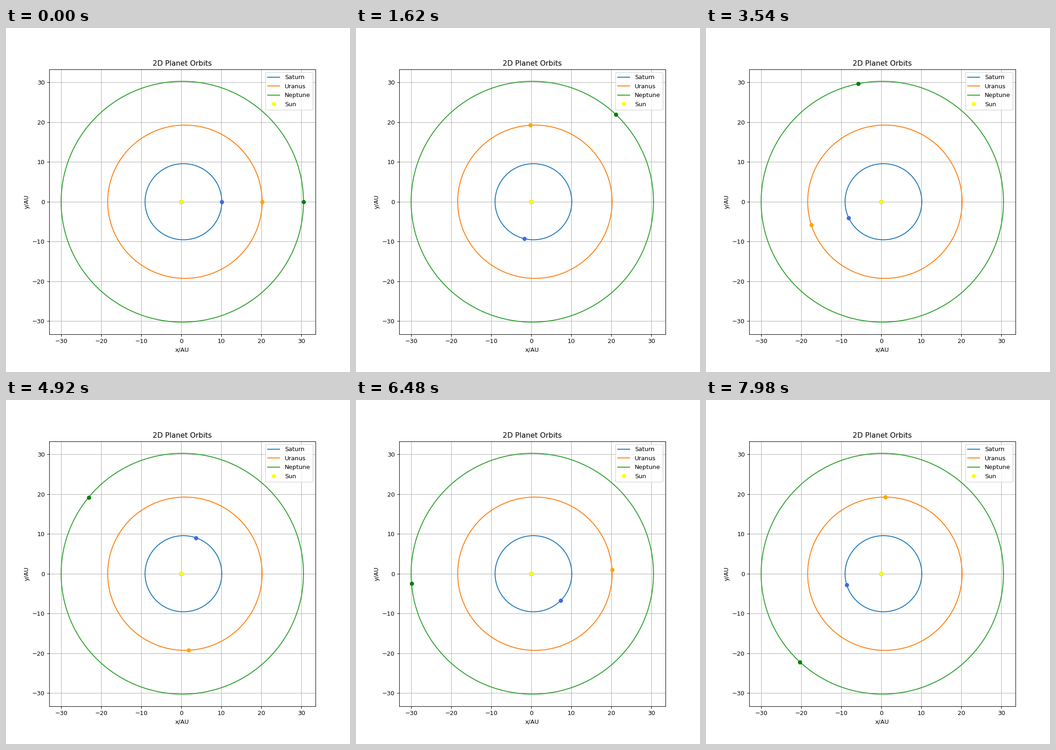
A matplotlib script that plays this animation: 748x748 px, repeating every 8000 ms.

```python
import numpy as np
import matplotlib.pyplot as plt
from matplotlib.animation import FuncAnimation

TICK_MS = 20        # timer interval
TICKS_PER_STEP = 3  # the planets move every 60 ms
LOOP_MS = 8000

# name, semi-major axis (AU), eccentricity, degrees per step, dot colour
PLANETS = [
    ("Saturn", 9.58, 0.0565, 9.608, "royalblue"),
    ("Uranus", 19.28, 0.0472, 3.3595, "orange"),
    ("Neptune", 30.26, 0.0086, 1.7108, "green"),
]


def orbit(a, e, theta):
    """Point on an ellipse with the Sun in one focus, aphelion on +x."""
    r = a * (1 - e**2) / (1 - e * np.cos(theta))
    return r * np.cos(theta), r * np.sin(theta)


fig, ax = plt.subplots(figsize=(8, 8), dpi=93.5)
turn = np.linspace(0, 2 * np.pi, 721)

for name, a, e, _, _ in PLANETS:
    ax.plot(*orbit(a, e, turn), label=name)

# Planet-coloured dots under the Sun give it a dark rim
for *_, color in PLANETS:
    ax.plot(0, 0, "o", color=color)
ax.plot(0, 0, "o", color="yellow", label="Sun")

dots = [ax.plot(*np.reshape(orbit(a, e, 0), (2, 1)), "o", color=color)[0]
        for _, a, e, _, color in PLANETS]

ax.set_title("2D Planet Orbits")
ax.set_xlabel("x/AU")
ax.set_ylabel("y/AU")
ax.grid(True)
ax.legend(loc="upper right")


def update(tick):
    step = tick // TICKS_PER_STEP
    for dot, (_, a, e, rate, _) in zip(dots, PLANETS):
        x, y = orbit(a, e, np.radians(rate * step))
        dot.set_data([x], [y])
    return dots


anim = FuncAnimation(fig, update, frames=LOOP_MS // TICK_MS,
                     interval=TICK_MS, repeat=True, repeat_delay=0)
plt.show()
```
